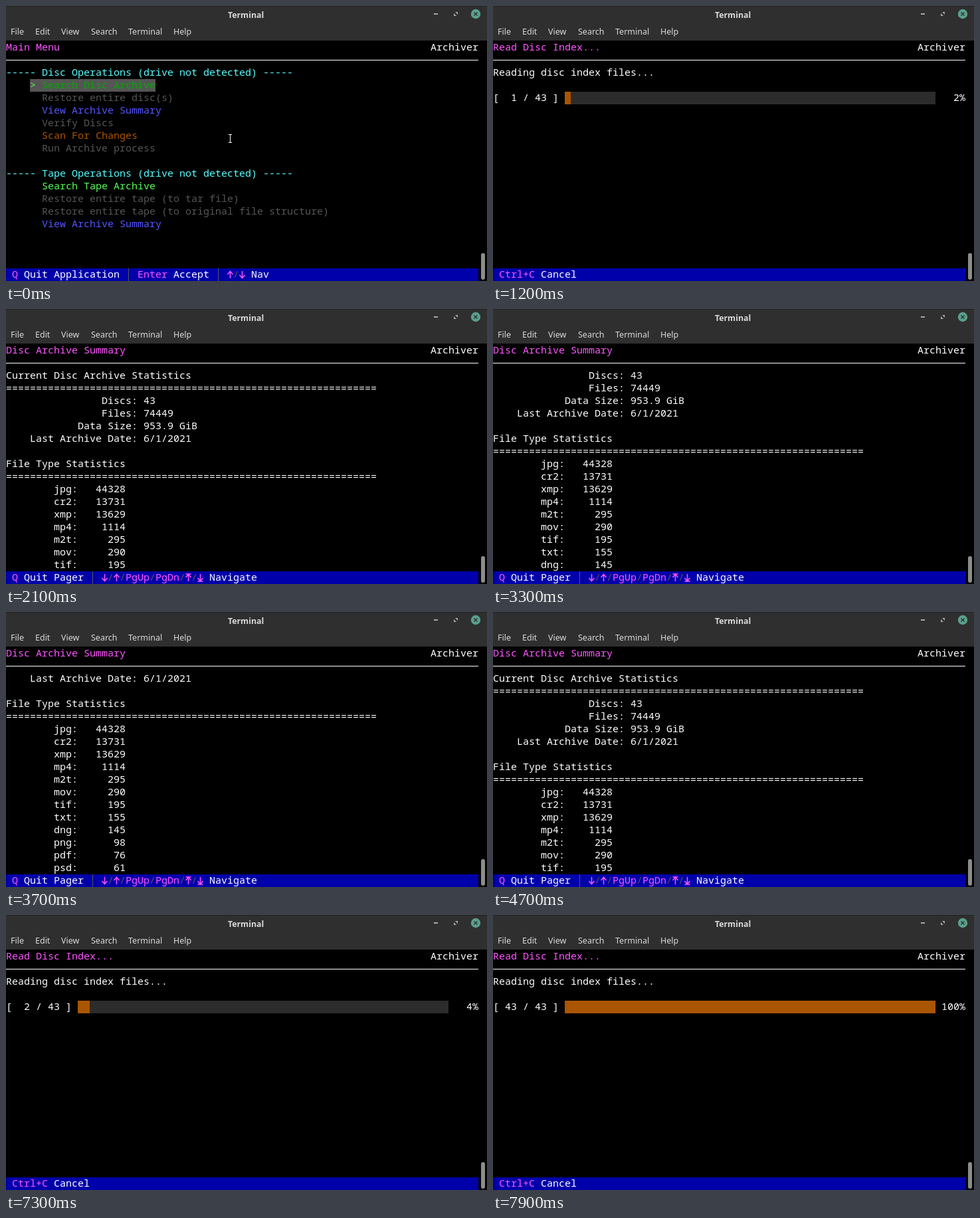
An HTML page with a canvas that plays this animation: 724 by 414 pixels, repeating every 8000 ms.

```html
<!DOCTYPE html>
<html lang="en">
<head>
<meta charset="utf-8">
<title>Terminal</title>
<style>
  html, body { margin: 0; width: 100%; height: 100%; overflow: hidden; background: #000; }
  canvas { display: block; }
</style>
</head>
<body>
<canvas id="stage" width="724" height="414"></canvas>
<script>
const ctx = document.getElementById('stage').getContext('2d');
const LOOP = 8000, CELL = 9, LINE = 19, TOP = 53, WIDTH = 711;
const MONO = '15px "Noto Sans Mono", "DejaVu Sans Mono", monospace';
const SANS = '"Noto Sans", "Open Sans", sans-serif';
const WHITE = '#ffffff', PINK = '#ff55ff', CYAN = '#55ffff', GREEN = '#55ff55',
      BLUE = '#5555ff', ORANGE = '#aa5500', GRAY = '#555555', NAVY = '#0000aa';
const DIMMED = { [GREEN]: '#00aa00', [BLUE]: '#0000aa' };

const menuRows = {
  2: ['----- Disc Operations (drive not detected) -----', CYAN, 0],
  3: ['Search Disc Archive', GREEN],
  4: ['Restore entire disc(s)', GRAY],
  5: ['View Archive Summary', BLUE],
  6: ['Verify Discs', GRAY],
  7: ['Scan For Changes', ORANGE],
  8: ['Run Archive process', GRAY],
  10: ['----- Tape Operations (drive not detected) -----', CYAN, 0],
  11: ['Search Tape Archive', GREEN],
  12: ['Restore entire tape (to tar file)', GRAY],
  13: ['Restore entire tape (to original file structure)', GRAY],
  14: ['View Archive Summary', BLUE],
};

const fileTypes = ('jpg 44328,cr2 13731,xmp 13629,mp4 1114,m2t 295,mov 290,tif 195,txt 155,dng 145,' +
  'png 98,pdf 76,psd 61,avi 52,html 44,wav 37,zip 31,xml 27,mp3 23,gif 19,doc 16,ini 14,' +
  'css 12,db 10,log 9,backup 8,csv 6,bmp 5,svg 4,xcf 3,mts 3,thm 2,json 2,ods 2,ico 1,' +
  'tar 1,odt 1,md5 1,rtf 1,config 1,sh 1,lua 1,bak 1,dat 1,tmp 1').split(',').map(s => s.split(' '));

const stat = (label, value) => (label + ':').padStart(22) + ' ' + value;
const summary = [
  'Current Disc Archive Statistics', '='.repeat(62),
  stat('Discs', '43'), stat('Files', '74449'),
  stat('Data Size', '953.9 GiB'), stat('Last Archive Date', '6/1/2021'),
  '', 'File Type Statistics', '='.repeat(62),
  ...fileTypes.map(([ext, count]) => (ext + ':').padStart(12) + count.padStart(8)),
];

// [start ms, screen, selected row | discs read | scroll line]
const timeline = [
  [0, menu, 3], [600, menu, 5],
  [1200, reading, 1], [1300, reading, 2], [1600, reading, 9], [1700, reading, 18],
  [1800, reading, 27], [1900, reading, 36], [2000, reading, 43],
  [2100, pager, 0], [3100, pager, 1], [3300, pager, 2], [3400, pager, 3],
  [3500, pager, 4], [3700, pager, 5], [3900, pager, 21], [4200, pager, 37], [4700, pager, 0],
  [5900, menu, 3],
  [7300, reading, 2], [7600, reading, 11], [7700, reading, 22], [7800, reading, 33], [7900, reading, 43],
];

function rect(x, y, w, h, color) {
  ctx.fillStyle = color;
  ctx.fillRect(x, y, w, h);
}

function stroke(color, width, ...paths) {
  ctx.strokeStyle = color;
  ctx.lineWidth = width;
  ctx.beginPath();
  for (const path of paths) path.forEach(([x, y], i) => i ? ctx.lineTo(x, y) : ctx.moveTo(x, y));
  ctx.stroke();
}

function print(row, col, text, color = WHITE) {
  ctx.font = MONO;
  ctx.fillStyle = color;
  ctx.fillText(text, col * CELL, TOP + row * LINE + 14);
}

function arrow(col, dir, bar) {
  const x = col * CELL + 4.5, y = 404.5, tip = y + dir * 5;
  const paths = [
    [[x, y - dir * 5.5], [x, tip]],
    [[x - 4, tip - dir * 4.5], [x, tip], [x + 4, tip - dir * 4.5]],
  ];
  if (bar) paths.push([[x - 4, tip + dir * 0.5], [x + 4, tip + dir * 0.5]]);
  stroke(PINK, 1.5, ...paths);
}

function header(title) {
  print(0, 0, title, PINK);
  print(0, 71, 'Archiver');
  rect(0, 81, WIDTH, 1, WHITE);
  rect(0, 395, WIDTH, 19, NAVY);
}

function hint(col, key, label) {
  print(18, col, key, PINK);
  print(18, col + key.length + 1, label);
}

const divider = col => rect(col * CELL + 4, 395, 1, 19, GRAY);

function menu(selected) {
  header('Main Menu');
  for (const [key, [text, color, col = 6]] of Object.entries(menuRows)) {
    const row = +key, active = row === selected;
    if (active) {
      rect(36, TOP + row * LINE, (text.length + 2) * CELL, LINE, GRAY);
      print(row, 4, '>', GREEN);
    }
    print(row, col, text, active ? DIMMED[color] : color);
  }
  hint(1, 'Q', 'Quit Application');
  divider(20);
  hint(22, 'Enter', 'Accept');
  divider(35);
  arrow(37, -1);
  print(18, 38, '/', GRAY);
  arrow(39, 1);
  print(18, 41, 'Nav');
}

function reading(count) {
  header('Read Disc Index...');
  print(2, 0, 'Reading disc index files...');
  print(4, 0, `[ ${String(count).padStart(2)} / 43 ]`);
  rect(108, 129, 558, LINE, '#2c2c2c');
  rect(108, 129, Math.floor(count / 43 * 62) * CELL, LINE, ORANGE);
  print(4, 74, Math.floor(count / 43 * 100).toString().padStart(4) + '%');
  hint(1, 'Ctrl+C', 'Cancel');
}

function pager(scroll) {
  header('Disc Archive Summary');
  summary.slice(scroll, scroll + 16).forEach((line, i) => print(i + 2, 0, line));
  hint(1, 'Q', 'Quit Pager');
  divider(14);
  arrow(16, 1);
  arrow(18, -1);
  print(18, 20, 'PgUp', PINK);
  print(18, 25, 'PgDn', PINK);
  arrow(30, -1, true);
  arrow(32, 1, true);
  for (const col of [17, 19, 24, 29, 31]) print(18, col, '/', GRAY);
  print(18, 34, 'Navigate');
}

function windowFrame() {
  rect(0, 0, 724, 52, '#2f2f2f');
  rect(0, 0, 724, 1, '#222222');
  ctx.fillStyle = '#dadada';
  ctx.font = `bold 12.3px ${SANS}`;
  ctx.fillText('Terminal', 334, 18);
  ctx.font = `12.5px ${SANS}`;
  const items = { File: 7, Edit: 44, View: 83, Search: 128, Terminal: 184, Help: 252 };
  for (const [name, x] of Object.entries(items)) ctx.fillText(name, x, 43);

  rect(644, 11, 6, 2, '#a8a8a8');
  ctx.fillStyle = '#a8a8a8';
  ctx.beginPath();
  for (const [x, y, d] of [[680, 9, -1], [674, 15, 1]]) {
    ctx.moveTo(x, y);
    ctx.lineTo(x + d * 4, y);
    ctx.lineTo(x, y + -d * 4);
  }
  ctx.fill();

  ctx.fillStyle = '#5b9f8c';
  ctx.beginPath();
  ctx.arc(707, 12, 7.2, 0, Math.PI * 2);
  ctx.fill();
  stroke('#2b3936', 1.5, [[704.5, 9.5], [709.5, 14.5]], [[709.5, 9.5], [704.5, 14.5]]);

  ctx.fillStyle = '#8c8c88';
  ctx.beginPath();
  ctx.roundRect(715, 372, 6, 40, 3);
  ctx.fill();
}

function mousePointer() {
  const beam = [
    [[335, 193.5], [340, 193.5]],
    [[337.5, 194], [337.5, 205]],
    [[335, 205.5], [340, 205.5]],
  ];
  stroke(WHITE, 1, ...beam);
}

function draw(now) {
  const t = now % LOOP;
  const [, screen, value] = timeline.findLast(([start]) => start <= t);
  rect(0, 0, 724, 414, '#000000');
  windowFrame();
  screen(value);
  if (t < 600) mousePointer();
}

const began = performance.now();
function tick() {
  draw(performance.now() - began);
  requestAnimationFrame(tick);
}
tick();
</script>
</body>
</html>
```
